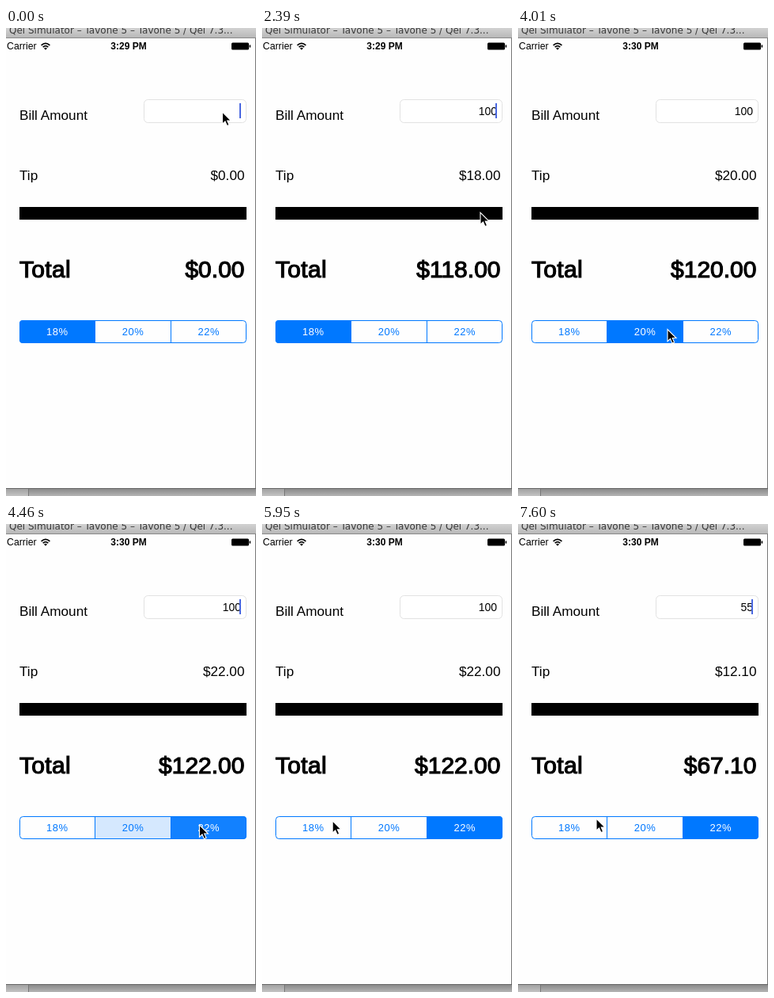
These frames come from a looping animation (316 by 591 pixels, 8 s). An HTML page:

```html
<!DOCTYPE html>
<html lang="en">
<head>
<meta charset="utf-8">
<title>Tip calculator</title>
<style>
  html, body { margin: 0; width: 100%; height: 100%; overflow: hidden; background: #fff; }
  svg { display: block; width: 316px; height: 591px; font-family: "Liberation Sans", Arial, sans-serif; }
  .end { text-anchor: end; }
  .label { font-size: 17.2px; }
  .total { font-size: 30px; stroke: #000; stroke-width: 1.2px; }
  .seg { font-size: 13px; letter-spacing: .5px; text-anchor: middle; }
</style>
</head>
<body>
<svg viewBox="0 0 316 591">
  <defs>
    <linearGradient id="bar" x2="0" y2="1"><stop stop-color="#d2d2d2"/><stop offset="1" stop-color="#b6b6b6"/></linearGradient>
    <linearGradient id="shade" x2="0" y2="1"><stop stop-color="#858585"/><stop offset="1" stop-color="#b4b4b4"/></linearGradient>
    <clipPath id="round"><rect x="17" y="369" width="287" height="29" rx="4"/></clipPath>
  </defs>

  <!-- window -->
  <rect width="316" height="13" fill="url(#bar)"/>
  <text x="4" y="7" font-size="12" fill="#3a3a3a" style="font-family:'DejaVu Sans',sans-serif">Qel Simulator – Tavone 5 – Tavone 5 / Qel 7.3...</text>
  <path d="M0 12.5H316" stroke="#8a8a8a"/>
  <rect y="13" width="315" height="568" fill="#fefefe"/>
  <path d="M315.5 13V581" stroke="#777"/>
  <rect y="581" width="316" height="10" fill="url(#shade)"/>
  <rect y="582" width="28" height="9" fill="#fff" opacity=".2"/>
  <path d="M0 581.5H316" stroke="#666"/>
  <path d="M28.5 582V591" stroke="#777"/>

  <!-- status bar -->
  <g font-size="12">
    <text x="1" y="27" font-size="12.3">Carrier</text>
    <text id="clock" x="155" y="27" text-anchor="middle" font-weight="bold"></text>
  </g>
  <g fill="none" stroke="#000" stroke-width="1.7">
    <path d="M44.6 21.8Q50 16.8 55.4 21.8M46.7 24.2Q50 21.1 53.3 24.2"/>
    <path d="M48 25.6Q50 24 52 25.6L50 27.8Z" fill="#000" stroke="none"/>
  </g>
  <rect x="285" y="18.5" width="22" height="9" rx="1.5"/>
  <rect x="307.6" y="21.2" width="1.6" height="3.6" rx=".8"/>

  <!-- form -->
  <text class="label" x="17" y="115.7">Bill Amount</text>
  <rect x="174.5" y="90.5" width="129" height="29" rx="5" fill="#fff" stroke="#e2e2e2"/>
  <text id="bill" class="end" x="297" y="110" font-size="14"></text>
  <rect id="caret" x="295" y="95" width="2" height="19" fill="#4a68e0"/>
  <text class="label" x="17" y="191.7">Tip</text>
  <text id="tip" class="label end" x="301.5" y="191.7"></text>
  <rect x="17" y="226" width="287" height="16"/>
  <text class="total" x="17" y="314.8" letter-spacing=".3">Total</text>
  <text id="total" class="total end" x="301.5" y="315"></text>

  <g id="segments" clip-path="url(#round)"></g>
  <path d="M112.5 369V398M208.5 369V398" stroke="#0078ff"/>
  <rect x="17.5" y="369.5" width="286" height="28" rx="4" fill="none" stroke="#0078ff"/>

  <path id="pointer" d="M0 0V15.2L3.5 12L6 17.6L8.6 16.5L6.2 11H11Z" stroke="#fff" stroke-width="1.1"/>
</svg>

<script>
const LOOP = 8000, STEP = 148.8, BLUE = "#0078ff";
const $ = id => document.getElementById(id);
const rates = [18, 20, 22];

const keys = { 3: "1", 5: "0", 7: "0", 42: "del", 45: "del", 46: "del", 50: "5", 51: "5" };
const taps = [{ at: 22, to: 1 }, { at: 30, to: 2 }];
const home = { x: 273.5, y: 106 };
const moves = [
  { from: 13, to: 16, x: 276, y: 233 },
  { from: 16, to: 20, x: 133.5, y: 381 },
  { from: 24, to: 28, x: 244.5, y: 380 },
  { from: 33, to: 38, x: 61, y: 383 },
  { from: 38, to: 41, x: 99, y: 372 }
];

const segments = rates.map((rate, i) => {
  const x = 17 + i * 95.7;
  $("segments").insertAdjacentHTML("beforeend",
    `<g><rect x="${x}" y="369" width="95.7" height="29" fill="${BLUE}"/>
     <text class="seg" x="${x + 47.8}" y="388">${rate}%</text></g>`);
  return $("segments").lastElementChild.children;
});

function billAt(step) {
  let bill = "";
  for (const at in keys) {
    if (at <= step) bill = keys[at] === "del" ? bill.slice(0, -1) : bill + keys[at];
  }
  return bill;
}

function pointerAt(step) {
  let { x, y } = home;
  for (const m of moves) {
    const u = Math.min(1, Math.max(0, (step - m.from) / (m.to - m.from)));
    const e = u * u * (3 - 2 * u);
    x += (m.x - x) * e;
    y += (m.y - y) * e;
  }
  return [x, y];
}

// Blinks once a second after the last key, with a short fade.
function caretAt(step) {
  if (step < 7 || step > 41) return 1;
  const phase = (step - 7) * STEP % 1000;
  return phase < 500 ? 1 : phase < 680 ? .5 : 0;
}

// A segment tints when pressed, then fills while the previous one fades.
function fillAt(i, step) {
  let level = i === 0 ? 1 : 0;
  for (const { at, to } of taps) {
    if (to === i && step >= at - 1) level = [.15, .93][step - at + 1] ?? 1;
    else if (to !== i && step >= at) level *= step === at ? .16 : 0;
  }
  return level;
}

function draw(now) {
  const step = Math.floor((now % LOOP + 6) / STEP);
  const bill = billAt(step);
  const rate = rates[taps.filter(tap => tap.at <= step).length];
  const tip = bill * rate / 100;

  $("clock").textContent = step < 26 ? "3:29 PM" : "3:30 PM";
  $("bill").textContent = bill;
  $("tip").textContent = "$" + tip.toFixed(2);
  $("total").textContent = "$" + (+bill + tip).toFixed(2);
  $("caret").setAttribute("opacity", caretAt(step));
  $("pointer").setAttribute("transform", `translate(${pointerAt(step)})`);

  segments.forEach(([box, text], i) => {
    const level = fillAt(i, step);
    box.setAttribute("opacity", level);
    text.setAttribute("fill", level > .5 ? "#fff" : BLUE);
  });
}

const start = performance.now();
function tick() {
  draw(performance.now() - start);
  requestAnimationFrame(tick);
}
tick();
</script>
</body>
</html>
```
